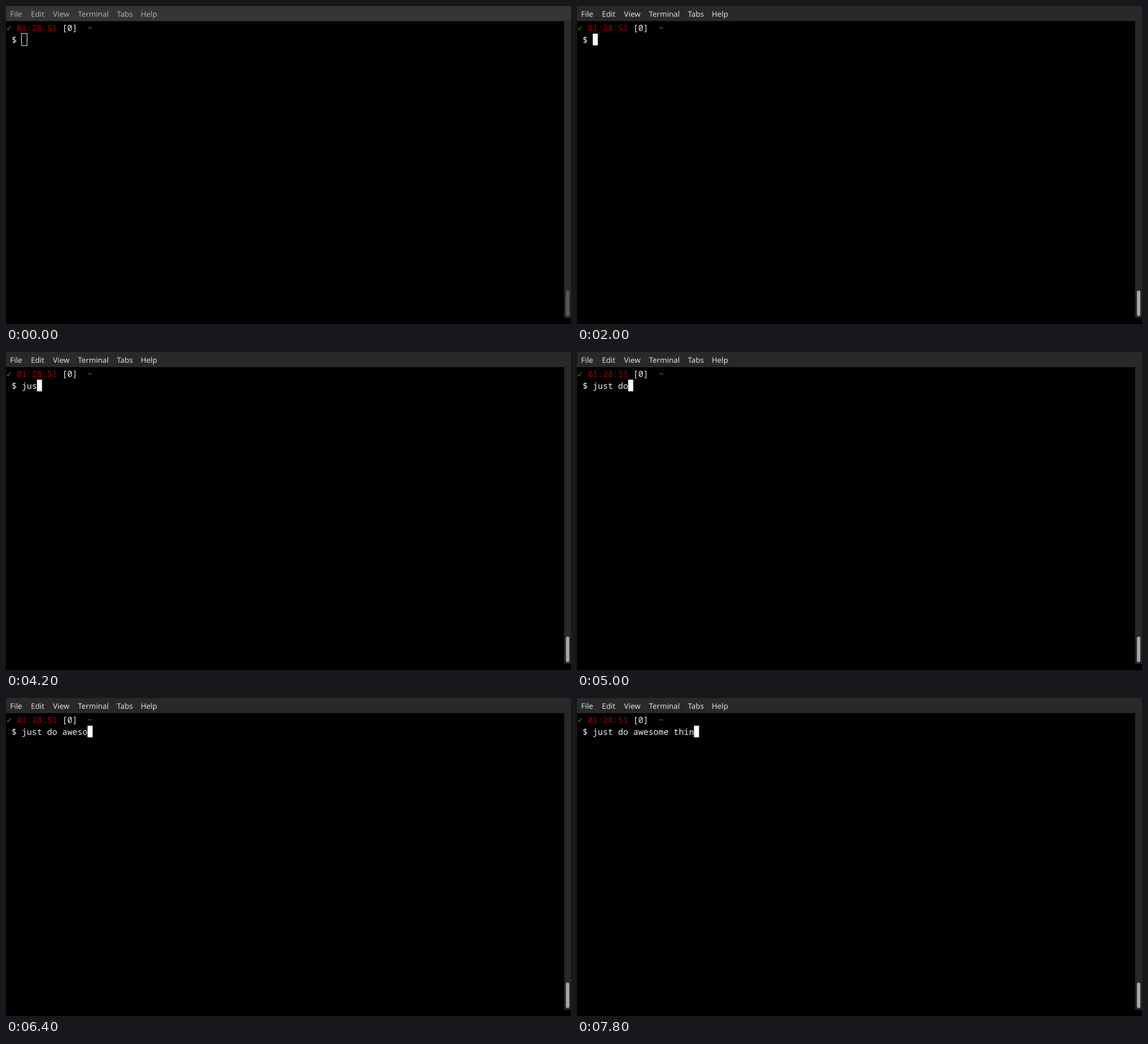
Recreate the animation shown at these times as an HTML page with a canvas. Size 998x561 px, loop 8 s.

```html
<!DOCTYPE html>
<html lang="en">
<head>
<meta charset="utf-8">
<title>Terminal</title>
<style>
  html, body { margin: 0; width: 100%; height: 100%; overflow: hidden; background: #000; }
  canvas { display: block; }
</style>
</head>
<body>
<canvas id="stage" width="998" height="561"></canvas>
<script>
const ctx = document.getElementById('stage').getContext('2d');
ctx.textRendering = 'geometricPrecision';
const LOOP = 8000;
const CELL = 8.94, LEFT = 1;
const ROWS = [44, 64.5];
const MONO = '14.9px "Noto Sans Mono", "DejaVu Sans Mono", monospace';
const SANS = '13.3px "Noto Sans", sans-serif';
const MENU = [['File', 7.3], ['Edit', 44], ['View', 83], ['Terminal', 127], ['Tabs', 195.7], ['Help', 238]];
const LINE = 'just do awesome thin';
// Time at which each character of LINE appears
const KEYS = [4000, 4100, 4200, 4300, 4500, 4700, 5000, 5100, 5400, 5400,
              6000, 6200, 6400, 6700, 6800, 7100, 7300, 7400, 7600, 7800];

const colX = col => LEFT + col * CELL;

function grey(from, to, k) {
  const v = Math.round(from + (to - from) * k);
  return `rgb(${v},${v},${v})`;
}

function box(x, y, w, h, color) {
  ctx.fillStyle = color;
  ctx.fillRect(x, y, w, h);
}

function cells(text, col, row, color) {
  ctx.font = MONO;
  ctx.fillStyle = color;
  [...text].forEach((ch, i) => {
    if (ch !== ' ') ctx.fillText(ch, colX(col + i), ROWS[row]);
  });
}

function drawChrome(focus) {
  box(0, 0, 998, 26.7, grey(53, 41, focus));
  box(985.8, 26.7, 12.2, 523.3, grey(43, 40, focus));
  ctx.font = SANS;
  ctx.fillStyle = grey(172, 224, focus);
  for (const [label, x] of MENU) ctx.fillText(label, x, 18.8);
  ctx.fillStyle = grey(88, 166, focus);
  ctx.beginPath();
  ctx.roundRect(989, 502, 6, 45, 3);
  ctx.fill();
}

function drawCursor(col, filled) {
  const x = colX(col), y = 48.8, h = 20.6;
  if (filled) {
    box(x, y, CELL, h, '#fff');
  } else {
    ctx.strokeStyle = '#fff';
    ctx.lineWidth = 1;
    ctx.strokeRect(x - 0.45, y - 0.45, CELL + 0.9, h + 0.9);
  }
}

function draw(t) {
  box(0, 0, 998, 561, '#000');
  drawChrome(t < 1900 ? 0 : t < 2000 ? 0.5 : 1);

  cells('✓', 0, 0, '#4e9a06');
  cells('01:28:51', 2, 0, '#a00000');
  cells('[0]', 11, 0, '#eee');
  cells('~', 16, 0, '#4e9a06');

  const typed = KEYS.filter(k => t >= k).length;
  cells('$', 1, 1, '#eee');
  cells(LINE.slice(0, typed), 3, 1, '#eee');
  drawCursor(3 + typed, t >= 1800);
}

const start = performance.now();
function tick() {
  draw((performance.now() - start) % LOOP);
  requestAnimationFrame(tick);
}
tick();
</script>
</body>
</html>
```
